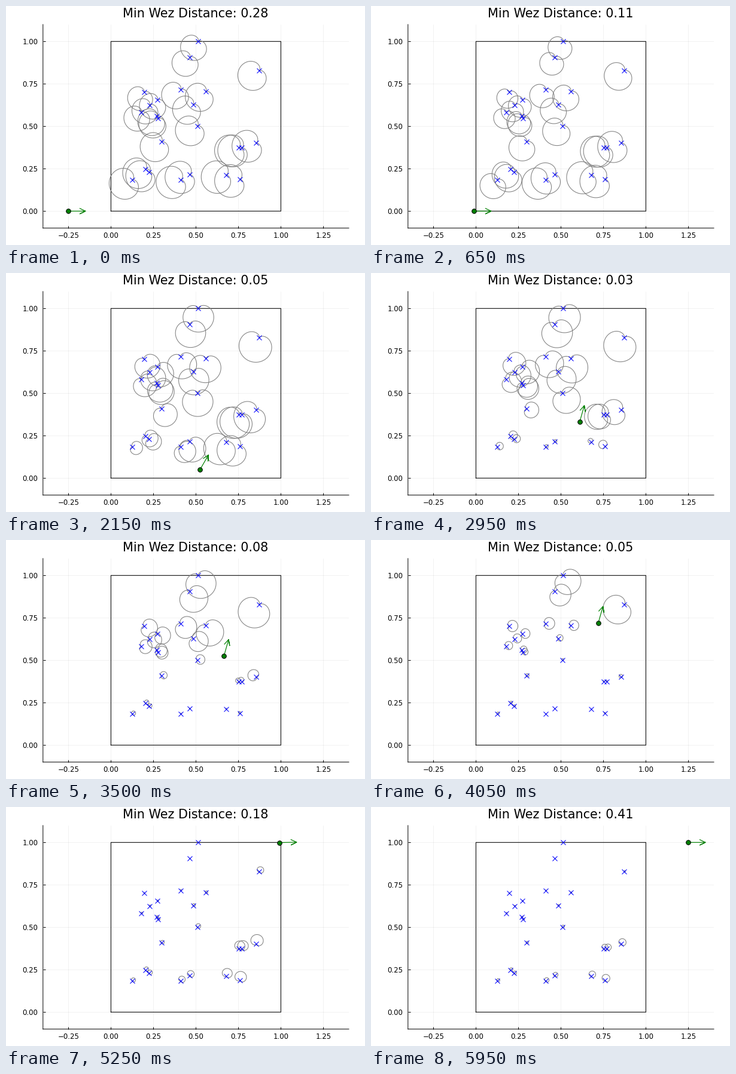
Recreate the animation shown at these times as a matplotlib script. Size 600 px wide and 400 px high, loop 6 s.

```python
import numpy as np
import matplotlib.pyplot as plt
from matplotlib.animation import FuncAnimation
from matplotlib.collections import LineCollection

FRAMES, INTERVAL = 120, 50
SPEED = 0.0184       # distance per step
CLIMB = np.radians(74.3)
R_MAX = 0.15         # largest zone range
ARROW, BARB = 0.1, 0.0365
PX = 0.72            # points per pixel at 100 dpi

# scattered threats, in the unit square
SITES = np.array([
    (0.514, 1.000), (0.465, 0.907), (0.873, 0.828), (0.195, 0.701),
    (0.410, 0.717), (0.558, 0.704), (0.274, 0.655), (0.228, 0.626),
    (0.484, 0.628), (0.179, 0.583), (0.270, 0.560), (0.278, 0.546),
    (0.509, 0.502), (0.298, 0.408), (0.752, 0.374), (0.771, 0.374),
    (0.855, 0.401), (0.204, 0.249), (0.225, 0.229), (0.127, 0.185),
    (0.411, 0.184), (0.463, 0.215), (0.678, 0.213), (0.758, 0.188),
])


def unit(angle):
    return np.stack([np.cos(angle), np.sin(angle)], axis=-1)


def ease(t, mid, width):
    return 1 / (1 + np.exp((mid - t) / width))


def course(t):
    """Heading: level, a sharp turn into the climb, a softer one out."""
    return CLIMB * (ease(t, 41, 1.4) - ease(t, 95.6, 2.3))


def fly(sub=20):
    """Positions at constant speed along the course, one per step."""
    mid = (np.arange((FRAMES - 1) * sub) + 0.5) / sub
    moves = np.cumsum(SPEED / sub * unit(course(mid)), axis=0)
    return np.array([-0.25, 0]) + np.vstack([[0, 0], moves[sub - 1::sub]])


TRACK = fly()

plt.rcParams["font.family"] = "DejaVu Sans"
fig = plt.figure(figsize=(6, 4), dpi=100, facecolor="white")
ax = fig.add_axes([61.8 / 600, 28.3 / 400, 511.2 / 600, 340.8 / 400])
ax.set(xlim=(-0.4, 1.4), ylim=(-0.1, 1.1))
ax.set_xticks(np.arange(-0.25, 1.3, 0.25))
ax.set_yticks(np.arange(0, 1.1, 0.25))
ax.xaxis.set_major_formatter("{x:.2f}")
ax.yaxis.set_major_formatter("{x:.2f}")
ax.tick_params(direction="in", length=4 * PX, width=PX, labelsize=11.8 * PX)
ax.tick_params(axis="x", pad=6 * PX)
ax.tick_params(axis="y", pad=8.3 * PX)
ax.grid(color="black", alpha=0.1, linewidth=0.5 * PX)
ax.set_axisbelow(True)
ax.spines[["top", "right"]].set_visible(False)
for side in ("left", "bottom"):
    ax.spines[side].set(linewidth=PX, snap=False)

title = fig.text(317 / 600, 1 - 18.6 / 400, "", fontsize=20.8 * PX,
                 ha="center", va="baseline")
ax.plot([0, 1, 1, 0, 0], [0, 0, 1, 1, 0], color="black", lw=1.05 * PX,
        zorder=3, snap=False)
zones = LineCollection([], colors="gray", linewidths=1.05 * PX, zorder=4)
ax.add_collection(zones)
ax.plot(*SITES.T, "x", color="blue", ms=8 * PX, mew=1.05 * PX, zorder=5,
        snap=False)
arrow, = ax.plot([], [], color="green", lw=1.2 * PX, zorder=6, snap=False,
                 solid_joinstyle="round")
dot, = ax.plot([], [], "o", color="green", ms=7.6 * PX, mec="black",
               mew=PX, zorder=7, snap=False)

THETA = np.linspace(0, 2 * np.pi, 121)


def update(i):
    pos, heading = TRACK[i], course(i)
    gap = pos - SITES
    bearing = np.arctan2(gap[:, 1], gap[:, 0])
    reach = R_MAX * (1 - np.cos(bearing - heading)) / 2

    # each cardioid points at the agent, cusp on its site
    r = reach[:, None] * (1 + np.cos(THETA)) / 2
    zones.set_segments(list(SITES[:, None] + r[..., None]
                            * unit(THETA + bearing[:, None])))

    tip = pos + ARROW * unit(heading)
    left, right = (tip - BARB * unit(heading + k) for k in (0.45, -0.45))
    arrow.set_data(*np.array([pos, tip, left, tip, right]).T)
    dot.set_data(*pos[:, None])
    nearest = np.min(np.hypot(*gap.T) - reach)
    title.set_text(f"Min Wez Distance: {nearest:.2f}")
    return zones, arrow, dot, title


anim = FuncAnimation(fig, update, frames=FRAMES, interval=INTERVAL,
                     init_func=lambda: update(0), repeat=True,
                     repeat_delay=0, blit=False)
plt.show()
```
